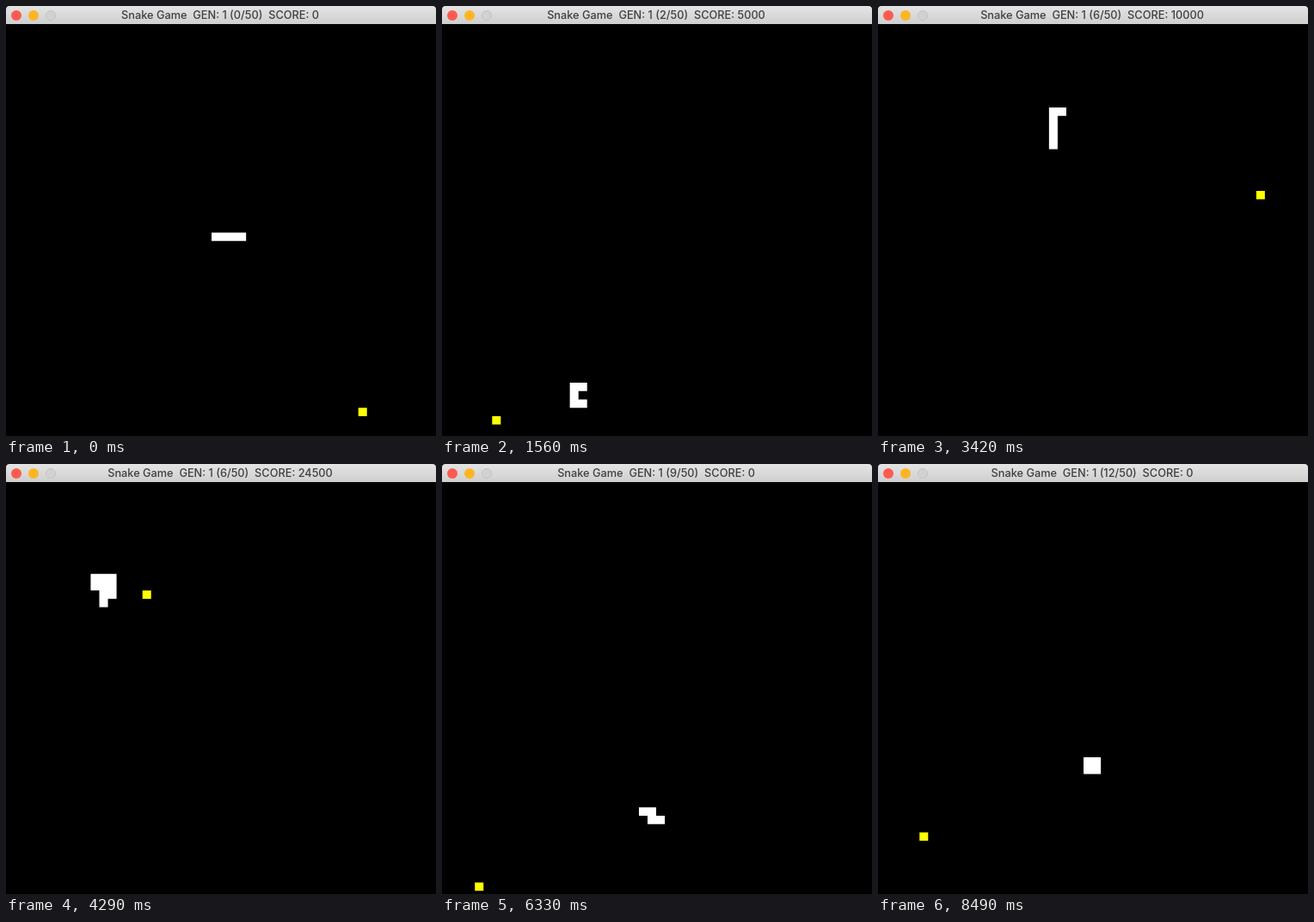
Animation, 500 px wide and 500 px high, one loop 8.52 s. Source, as an HTML page with a canvas:

```html
<!DOCTYPE html>
<html lang="en">
<head>
<meta charset="utf-8">
<title>Snake Game</title>
<style>
  html, body { margin: 0; width: 100%; height: 100%; overflow: hidden; background: #000; }
  #stage { position: relative; width: 500px; height: 500px; overflow: hidden; }
  canvas { position: absolute; left: 0; top: 0; }
  #bar {
    position: absolute; left: 0; top: 0; width: 500px; height: 21px;
    border-radius: 4px 4px 0 0;
    background: linear-gradient(#e4e4e4, #cfcfcf);
  }
  #title {
    position: absolute; left: 0; top: 0; width: 498px;
    font: 500 12.75px/22px Inter, Roboto, sans-serif;
    color: #3f3f3f; text-align: center; white-space: pre;
  }
  .light {
    position: absolute; top: 5px; width: 12px; height: 12px;
    border-radius: 50%; box-sizing: border-box;
  }
</style>
</head>
<body>
<div id="stage">
  <canvas id="board" width="500" height="500"></canvas>
  <div id="bar">
    <i class="light" style="left:6px;background:#fc5b50"></i>
    <i class="light" style="left:26px;background:#fdb524"></i>
    <i class="light" style="left:46px;background:#d2d2d2;border:1px solid #c2c2c2"></i>
    <div id="title"></div>
  </div>
</div>
<script>
const TICK = 30, TICKS = 284, SPEED = 4, START_LENGTH = 4;
const CELL_W = 10.04, CELL_H = 9.7, LEFT = -1.95, TOP = 21;

// Moves: letters, then how often to repeat them. "at" is the first tick.
const games = [
  { at: 0, moves: 'R22', food: [[41, 46]] },
  { at: 6, moves: 'U25', food: [[30, 47]] },
  { at: 13, lead: 3, moves: 'D15 L8 D3 L4 D2 RUULDD40', food: [[19, 40], [6, 47]] },
  { at: 57, moves: 'D22 L10 DLUR30', food: [[36, 12]] },
  { at: 80, lead: 1, moves: 'R22', food: [[48, 4]] },
  { at: 86, moves: 'R6 D13 L20 U4 L13', food: [[33, 43]] },
  { at: 100, moves: 'D5 R10 U20 L17 D10 R24 D16 L36 U22 R3 U R U2 L2 D R',
    food: [[37, 30], [20, 10], [44, 20], [28, 36], [8, 16], [16, 13]] },
  { at: 146, moves: 'U14 L6 URDL30', food: [[30, 8]] },
  { at: 176, moves: 'D10 L12 DR8 DRUL30', food: [[40, 44]] },
  { at: 203, lead: 3, moves: 'D6 L11 DR15 URDL30', food: [[4, 48]] },
  { at: 238, moves: 'D12 LURD40', food: [[22, 41]] },
  { at: 264, moves: 'R22', food: [[35, 20]] },
  { at: 270, moves: 'D8 L3 DRUL40', food: [[5, 42]] }
];

const steps = { L: [-1, 0], R: [1, 0], U: [0, -1], D: [0, 1] };

function walk(moves) {
  const cells = [[24, 25], [25, 25], [26, 25], [27, 25]];
  for (const part of moves.split(' ')) {
    const [, letters, count] = part.match(/([LRUD]+)(\d*)/);
    for (const letter of letters.repeat(count || 1)) {
      const [x, y] = cells[cells.length - 1];
      const [dx, dy] = steps[letter];
      cells.push([x + dx, y + dy]);
    }
  }
  return cells;
}

for (const game of games) game.path = walk(game.moves);

const title = document.getElementById('title');
const ctx = document.getElementById('board').getContext('2d');

// One path for all cells, so that no seams show between them.
function drawCells(cells, color) {
  ctx.fillStyle = color;
  ctx.beginPath();
  for (const [c, r] of cells) {
    ctx.rect(LEFT + c * CELL_W, TOP + r * CELL_H, CELL_W, CELL_H);
  }
  ctx.fill();
}

function countEaten({ path, food }, head) {
  let eaten = 0;
  for (let i = START_LENGTH; i <= head && eaten < food.length; i++) {
    const [x, y] = food[eaten];
    if (path[i][0] === x && path[i][1] === y) eaten++;
  }
  return eaten;
}

function draw(tick) {
  let id = games.length - 1;
  while (games[id].at > tick) id--;
  const game = games[id];
  const moved = SPEED * (tick - game.at) + (game.lead || 0);
  const head = Math.min(game.path.length - 1, START_LENGTH - 1 + moved);
  const eaten = countEaten(game, head);
  const length = START_LENGTH + eaten;
  const score = eaten * 5000 - (eaten > 4 ? 500 : 0);

  ctx.fillStyle = '#000';
  ctx.fillRect(0, 0, 500, 500);
  drawCells(game.food.slice(eaten, eaten + 1), '#ff0');
  drawCells(game.path.slice(Math.max(0, head + 1 - length), head + 1), '#fff');
  title.textContent = `Snake Game  GEN: 1 (${id}/50)  SCORE: ${score}`;
}

const begin = performance.now();
let shown = -1;
function loop() {
  const tick = Math.floor((performance.now() - begin) / TICK) % TICKS;
  if (tick !== shown) draw(shown = tick);
  requestAnimationFrame(loop);
}
loop();
</script>
</body>
</html>
```
